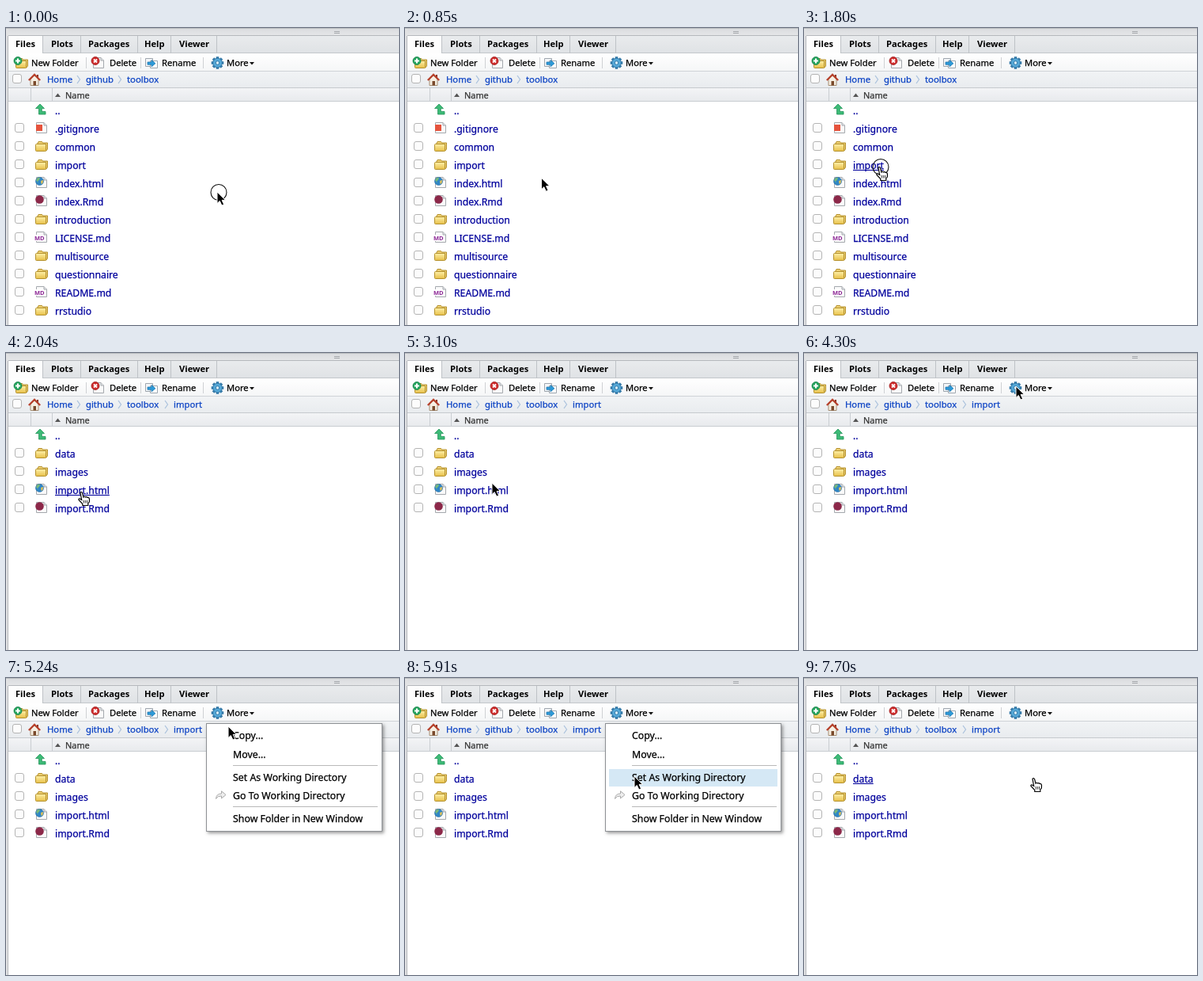
An HTML page with a canvas for the animation above (8000 ms loop, 497x375 px).

```html
<!DOCTYPE html>
<html lang="en">
<head>
<meta charset="utf-8">
<title>File pane</title>
<style>
html, body { margin: 0; width: 100%; height: 100%; overflow: hidden; background: #fff; }
canvas { display: block; }
</style>
</head>
<body>
<canvas id="stage" width="497" height="375"></canvas>
<script>
const ctx = document.getElementById('stage').getContext('2d');
const LOOP = 8000, ROW = 23, FIRST_ROW = 105;

// Pointer hot spot: time, x, y
const path = [
  [0, 267, 207], [240, 267, 207], [1090, 128, 181], [1440, 95, 175],
  [2880, 95, 175], [3680, 204, 95], [4300, 268, 42],
  [4960, 268, 42], [5240, 281, 61], [5800, 291, 117], [5910, 290, 124],
  [7640, 290, 124], [7700, 290, 126], [LOOP, 290, 126]
];
// Click rings: shown from, fading from, gone at
const clicks = [[-1, 60, 110], [1800, 1980, 2040], [4530, 4590, 4650], [7530, 7640, 7700]];
const OPEN_FOLDER = 1920, MENU_OPEN = 4590, MENU_CLOSE = 7640;

const rootList = [
  ['up', '..'], ['git', '.gitignore'], ['folder', 'common'], ['folder', 'import'],
  ['html', 'index.html'], ['rmd', 'index.Rmd'], ['folder', 'introduction'],
  ['md', 'LICENSE.md'], ['folder', 'multisource'], ['folder', 'questionnaire'],
  ['md', 'README.md'], ['folder', 'rrstudio']
];
const importList = [
  ['up', '..'], ['folder', 'data'], ['folder', 'images'],
  ['html', 'import.html'], ['rmd', 'import.Rmd']
];
const menuItems = [
  ['Copy...', 73], ['Move...', 97], ['Set As Working Directory', 126],
  ['Go To Working Directory', 149], ['Show Folder in New Window', 178]
];

function rect(x, y, w, h, fill) {
  ctx.fillStyle = fill;
  ctx.fillRect(x, y, w, h);
}

function shade(x, y, w, h, top, bottom) {
  const g = ctx.createLinearGradient(0, y, 0, y + h);
  g.addColorStop(0, top);
  g.addColorStop(1, bottom);
  rect(x, y, w, h, g);
}

function paint(fill, stroke, width = 1) {
  if (fill) { ctx.fillStyle = fill; ctx.fill(); }
  if (stroke) { ctx.strokeStyle = stroke; ctx.lineWidth = width; ctx.stroke(); }
}

function shape(d, fill, stroke, width) {
  const p = new Path2D(d);
  if (fill) { ctx.fillStyle = fill; ctx.fill(p); }
  if (stroke) { ctx.strokeStyle = stroke; ctx.lineWidth = width || 1; ctx.stroke(p); }
}

function disc(x, y, r, fill, stroke, width) {
  ctx.beginPath();
  ctx.arc(x, y, r, 0, Math.PI * 2);
  paint(fill, stroke, width);
}

function text(s, x, y, size, color = '#000', weight = 400) {
  ctx.font = `${weight} ${size}px "Noto Sans", "Open Sans", sans-serif`;
  ctx.fillStyle = ctx.strokeStyle = color;
  ctx.fillText(s, x, y);
  if (weight === 400) { ctx.lineWidth = .25; ctx.strokeText(s, x, y); }
  return ctx.measureText(s).width;
}

function at(x, y, draw) {
  ctx.save();
  ctx.translate(x, y);
  draw();
  ctx.restore();
}

function checkbox(x, y) {
  ctx.beginPath();
  ctx.roundRect(x + .5, y + .5, 11, 11, 2.5);
  paint('#fcfcfc', '#b4b4b4');
}

function page() {
  shape('M1.5 1.5H11L14.5 5V14.5H1.5Z', '#fafafa', '#a4a8ad');
  shape('M11 1.5V5H14.5', '#e3e5e8', '#a4a8ad');
}

// Icons are drawn on a 16 pixel square
const icons = {
  up() {
    shape('M6 1L11.5 6.5H8.3V10.5H13V14H4.5V6.5H.5Z', '#3dbb77', '#23935a', .8);
  },
  folder() {
    shape('M2.5 5.5L4 2.5H8.5L9.5 4H15.5V12L13.5 14.5', '#eed073', '#b4912e');
    const g = ctx.createLinearGradient(0, 5, 0, 15);
    g.addColorStop(0, '#fff2ad');
    g.addColorStop(1, '#e6bd43');
    shape('M1.5 5.5H13.5V13.5Q13.5 14.5 12.5 14.5H1.5Q.5 14.5 .5 13.5V6.5Q.5 5.5 1.5 5.5Z', g, '#b4912e');
  },
  git() {
    page();
    rect(1, 4, 8, 8, '#e5533d');
  },
  html() {
    page();
    disc(5.5, 6.5, 5, '#2f86c6', '#2468a0', .6);
    shape('M1 5Q3 1 6 2L5 5L3 6.5L4 9Z', '#79b97a');
    shape('M7 6L10 5L9.5 9L7.5 10Z', '#e0c15a');
  },
  rmd() {
    page();
    disc(5.5, 6.5, 5.3, '#8c2849');
  },
  md() {
    page();
    rect(-1, 5, 12, 8, '#fff');
    text('MD', -1, 12, 7.5, '#8b2594', 700);
  }
};

function toolbar() {
  at(10, 36, () => {
    ctx.translate(2, 0);
    icons.folder();
    disc(3, 5.5, 5, '#25a45e', '#168148', .8);
    shape('M3 2.5V8.5M0 5.5H6', null, '#fff', 2);
  });
  text('New Folder', 32, 48, 11.2);
  rect(101, 37, 1, 14, '#cfd1d4');
  at(109, 36, () => {
    page();
    disc(4, 5.5, 5, '#cf2d2d', '#9d1b1b', .8);
    shape('M2 3.5L6 7.5M6 3.5L2 7.5', null, '#fff', 1.8);
  });
  text('Delete', 131, 48, 11.2);
  rect(170, 37, 1, 14, '#cfd1d4');
  at(176, 36, () => {
    shape('M.5 2.5H9.5V12.5H.5Z', '#f4f6f8', '#9ea6ae');
    shape('M6.5 5.5H15.5V14.5H6.5Z', '#fff', '#9ea6ae');
    shape('M3 7H8V4.5L13 8.7L8 13V10.3H3Z', '#2d9ad8', '#1a72ab', .7);
  });
  text('Rename', 197, 48, 11.2);
  rect(249, 37, 1, 14, '#cfd1d4');
  at(267.5, 44, () => {
    for (let i = 0; i < 8; i++) {
      ctx.rotate(Math.PI / 4);
      rect(-1.8, -7.8, 3.6, 4, '#3479a8');
    }
    disc(0, 0, 5.8, '#55a9d8', '#3479a8');
    disc(0, 0, 2.3, '#d8edf8', '#3479a8');
  });
  text('More', 279, 48, 11.2);
  shape('M308 43H314L311 46.5Z', '#111');
}

function chrome(inFolder) {
  rect(0, 0, 497, 375, '#fff');
  shade(0, 0, 497, 10, '#d9dbde', '#e6e7e9');
  rect(0, 0, 497, 1, '#b9bcc0');
  rect(0, 1, 3, 374, '#e1e2e4');
  rect(415, 4, 7, 1, '#a5a8ac');
  rect(415, 6, 7, 1, '#a5a8ac');

  shade(3, 10, 494, 22, '#e9ebed', '#dfe2e5');
  rect(3, 9, 494, 1, '#b5b8bc');
  rect(3, 31, 494, 1, '#c3c7cb');
  rect(3, 10, 43, 22, '#fdfdfd');
  for (const x of [46, 94, 166, 208, 266]) rect(x, 10, 1, 22, '#bec2c6');
  [['Files', 12], ['Plots', 57], ['Packages', 104], ['Help', 175], ['Viewer', 219]]
    .forEach(([s, x]) => text(s, x, 24, 11.15, '#000', 700));

  shade(3, 32, 494, 22, '#fff', '#f5f6f7');
  toolbar();

  rect(3, 54, 494, 1, '#cfd3d7');
  shade(3, 55, 494, 20, '#f1f3f5', '#e9ecef');
  checkbox(8, 58);
  at(28, 57, () => {
    rect(11, 2, 2, 4, '#8c3b2a');
    shape('M3 8V15.5H13V8L8 3Z', '#f6efe2', '#a48d72');
    rect(6.5, 10, 3.5, 5.5, '#7a4a2c');
    shape('M.8 9L8 1.8L15.2 9', null, '#b8412c', 2.2);
  });
  const crumbs = [['Home', 52], ['github', 101], ['toolbox', 153]];
  if (inFolder) crumbs.push(['import', 212]);
  crumbs.forEach(([s, x], i) => {
    text(s, x, 69, 11.3, '#0b42c4');
    if (i) shape(`M${x - 11} 60L${x - 7.5} 65L${x - 11} 70`, null, '#a9c0dc', 1.2);
  });

  rect(3, 75, 494, 1, '#c6cace');
  shade(3, 76, 494, 16, '#f3f4f6', '#e8eaed');
  rect(3, 92, 494, 1, '#c9cdd1');
  rect(31, 76, 1, 16, '#c9cdd1');
  rect(58, 76, 1, 16, '#c9cdd1');
  shape('M62 87H69L65.5 82.5Z', '#555');
  text('Name', 75, 89, 10.9, '#333');
  rect(2, 10, 1, 365, '#b5b8bc');
}

function fileList(files, hovered) {
  files.forEach(([icon, name], i) => {
    const y = FIRST_ROW + i * ROW;
    if (i) checkbox(11, y - 8);
    at(37, y - 10, icons[icon]);
    const w = text(name, 62, y + 4, 12.25, '#00009c');
    if (i === hovered) rect(62, y + 5, w, 1, '#00009c');
  });
}

function menu(y) {
  ctx.save();
  ctx.shadowColor = 'rgba(0,0,0,.4)';
  ctx.shadowBlur = 4;
  ctx.shadowOffsetX = ctx.shadowOffsetY = 1.5;
  rect(253, 57, 223, 137, '#8e9195');
  ctx.restore();
  rect(254, 58, 221, 135, '#fff');
  for (const [label, mid] of menuItems) {
    if (Math.abs(y - mid) < 11) rect(258, mid - 11, 213, 22, '#d5e8f5');
    text(label, 287, mid + 4, 12.35);
  }
  rect(287, 110, 183, 1, '#b9b9b9');
  rect(287, 162, 183, 1, '#b9b9b9');
  shape('M265.5 152.5Q266 146 272.5 146V142.8L278 147.5L272.5 152V149Q268 148.5 265.5 152.5Z', '#eee', '#aaa');
}

function arrow() {
  shape('M0 0V14.5L3.3 11.4L5.9 17L8.6 15.8L6.1 10.4H10.6Z', '#000', '#fff', 1);
}

function hand() {
  shape('M-1 1.5Q0 -.5 1.5 1.5L3 7Q4.5 5.5 5.5 7Q7 6 8 7.5Q10 7 10.5 9.5L10.3 13L8.8 15V17.5H1.8V15.5L-3 10.5Q-3.5 8.5 -1.5 9L.7 10.5Z',
    '#fff', '#000', 1.2);
  shape('M3.3 11V14.5M5.4 11V14.5M7.5 11V14.5', null, '#000', .8);
}

// Smooth curve through the path that stops at every rest
function pointer(t) {
  let i = 0;
  while (i < path.length - 2 && t >= path[i + 1][0]) i++;
  const a = path[i], b = path[i + 1], span = b[0] - a[0], u = (t - a[0]) / span;
  const slope = (k, axis) => {
    const p = path[k - 1], q = path[k], n = path[k + 1];
    if (!p || !n) return 0;
    const still = (v, w) => v[1] === w[1] && v[2] === w[2];
    return still(p, q) || still(q, n) ? 0 : (n[axis] - p[axis]) / (n[0] - p[0]) * span;
  };
  return [1, 2].map(axis => {
    const m = slope(i, axis), n = slope(i + 1, axis), d = b[axis] - a[axis];
    return a[axis] + u * (m + u * (3 * d - 2 * m - n + u * (m + n - 2 * d)));
  });
}

function draw(t) {
  const [x, y] = pointer(t);
  const inFolder = t >= OPEN_FOLDER, menuShown = t >= MENU_OPEN && t < MENU_CLOSE;
  const row = Math.round((y - FIRST_ROW) / ROW), offset = Math.abs(y - FIRST_ROW - row * ROW);
  const onLink = !menuShown && row >= 0 && offset < 6.8;
  const hovered = onLink || (row === 0 && y > 94) ? row : -1;

  chrome(inFolder);
  fileList(inFolder ? importList : rootList, menuShown ? -1 : hovered);
  if (menuShown) menu(y);
  for (const [from, fade, end] of clicks) {
    if (t < from || t >= end) continue;
    ctx.globalAlpha = t < fade ? 1 : .45;
    disc(x + 2, y + .5, 10, null, '#111', 1.1);
    ctx.globalAlpha = 1;
  }
  at(x, y, onLink ? hand : arrow);
}

function frame() {
  draw(performance.now() % LOOP);
  requestAnimationFrame(frame);
}
frame();
</script>
</body>
</html>
```
